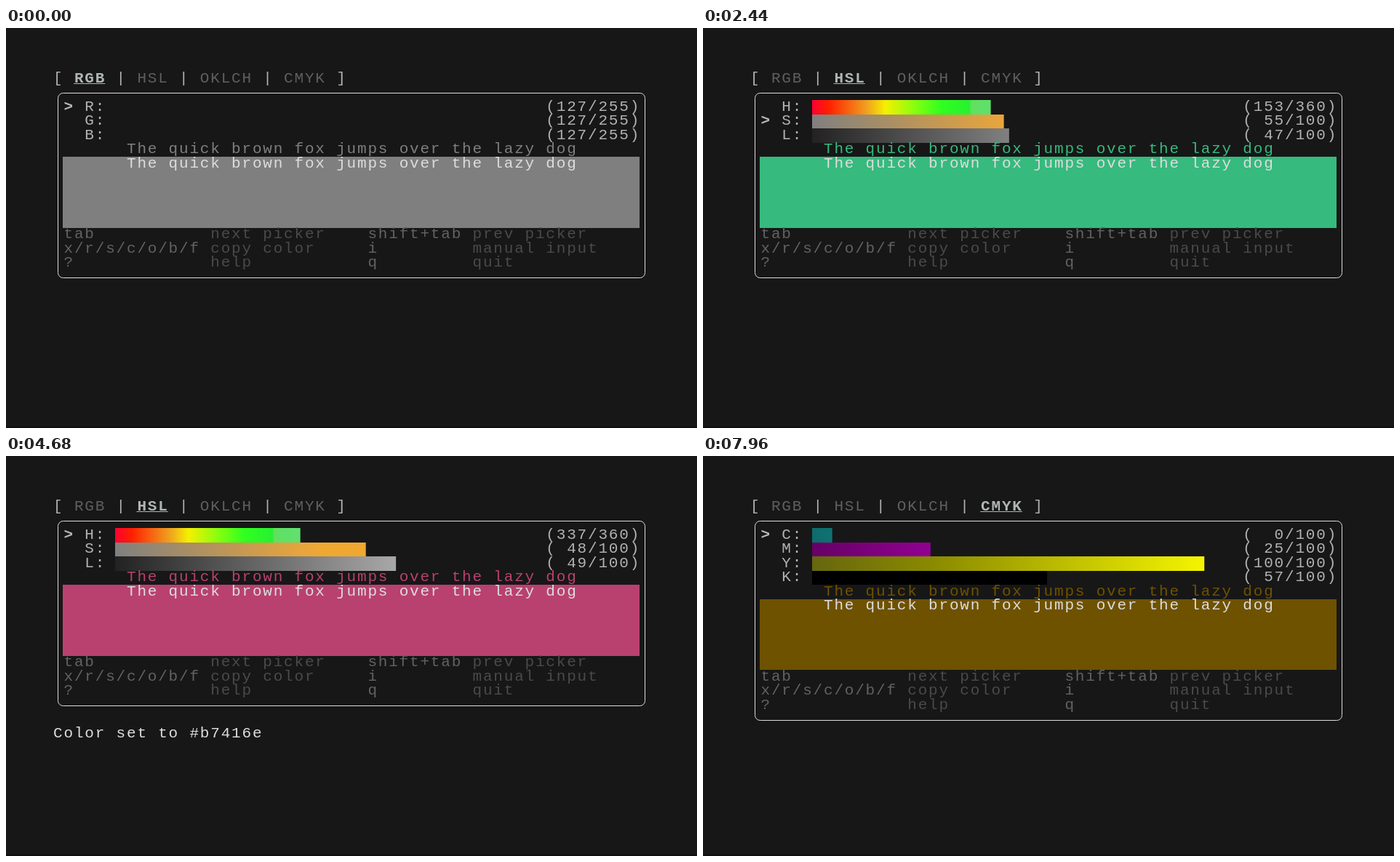
These frames come from a looping animation (950 px wide and 550 px high, 8000 ms). An HTML page with a canvas:

```html
<!DOCTYPE html>
<html lang="en">
<head>
<meta charset="utf-8">
<title>Terminal color picker</title>
<style>
  html, body { margin: 0; width: 100%; height: 100%; overflow: hidden; background: #171717; }
  canvas { display: block; }
</style>
</head>
<body>
<canvas id="stage" width="950" height="550"></canvas>
<script>
const ctx = document.getElementById('stage').getContext('2d');
const LOOP = 8000, TICK = 40;
const CELL = 14.41, LINE = 19.53, LEFT = 64.2, TOP = 60;
const BAR_COL = 6, BAR_CELLS = 40, EDGE = 884;
const FONT = '21px "Liberation Mono", "Courier New", monospace';
const LIGHT = '#b2b2b2', KEY = '#626262', DIM = '#4a4a4a', PALE = '#dddddd';

const colX = c => LEFT + c * CELL;
const rowY = r => TOP + r * LINE;

// Keys are [start, end, value]: the value runs while keys are pressed, the bar follows afterwards.
const channel = (name, max, start, stops, keys) => ({ name, max, start, stops, keys });

const pickers = [
  { name: 'RGB', col: 2, channels: [
    channel('R', 255, 0, [[0, '#600000'], [1, '#ff0000']],
      [[20, 20, 127], [570, 720, 67], [4040, 4040, 183]]),
    channel('G', 255, 0, [[0, '#346400'], [.15, '#007500'], [1, '#00ff00']],
      [[20, 20, 127], [380, 500, 175], [4040, 4040, 65]]),
    channel('B', 255, 0, [[0, '#000060'], [1, '#0000ff']],
      [[20, 20, 127], [4040, 4040, 110]])
  ], color: (r, g, b) => `rgb(${r}, ${g}, ${b})` },

  { name: 'HSL', col: 8, channels: [
    channel('H', 360, .5, [[0, '#ff0030'], [.04, '#ff2000'], [.13, '#f0a020'], [.175, '#f5f000'],
      [.25, '#80ff10'], [.31, '#2eff20'], [.375, '#28f030'], [.38, '#60e060'], [.44, '#60e070'],
      [.5, '#00f0f0'], [.67, '#2020ff'], [.83, '#ff00ff'], [1, '#ff0030']],
      [[1800, 1800, 153], [2720, 2812, 117], [3120, 3240, 159], [4680, 4680, 337]]),
    channel('S', 100, .5, [[0, '#808080'], [.45, '#e8a53c'], [.5, '#f0a830'], [1, '#f0a830']],
      [[1800, 1800, 45], [2360, 2412, 55], [3280, 3300, 60], [4680, 4680, 48]]),
    channel('L', 100, .5, [[0, '#222222'], [1, '#eaeaea']],
      [[1800, 1800, 47], [2560, 2680, 67], [4680, 4680, 49]])
  ], color: (h, s, l) => `hsl(${h}, ${s}%, ${l}%)` },

  { name: 'OKLCH', col: 14, channels: [
    channel('H', 360, .5, [[0, '#f5196e'], [.09, '#ff0010'], [.16, '#ff0000'], [.27, '#e07000'],
      [.5, '#40c040'], [.75, '#3060ff'], [1, '#f5196e']],
      [[5120, 5120, 0], [5280, 5477, 90], [5530, 5560, 98]]),
    channel('C', 500, .5, [[0, '#507c6e'], [.32, '#12aa28'], [1, '#00e000']],
      [[5120, 5120, 159]]),
    channel('L', 1000, .5, [[0, '#000000'], [1, '#eeeeee']],
      [[5120, 5120, 554], [5640, 5880, 454]])
  ], color: (h, c, l) => `oklch(${l / 1000} ${c / 1000} ${h})` },

  { name: 'CMYK', col: 22, channels: [
    channel('C', 100, .39, [[0, '#0f6b6b'], [1, '#00ffff']], [[7760, 7760, 0]]),
    channel('M', 100, .5, [[0, '#660066'], [1, '#ff00ff']], [[7760, 7760, 25]]),
    channel('Y', 100, .5, [[0, '#66660f'], [.3, '#8c8c00'], [1, '#ffff00']], [[7760, 7760, 100]]),
    channel('K', 100, .5, [[0, '#000000'], [1, '#000000']], [[7760, 7760, 57]])
  ], color: (...v) => {
    const [c, m, y, k] = v.map(n => 1 - n / 100);
    return `rgb(${[c, m, y].map(n => Math.round(255 * n * k)).join(', ')})`;
  } }
];

const tabTimes = [[0, 0], [1800, 1], [4040, 0], [4680, 1], [5120, 2], [7760, 3]];
const cursorTimes = [[0, 0], [360, 1], [540, 0], [2320, 1], [2540, 2], [2700, 0],
  [3260, 1], [3340, 0], [5600, 2], [5960, 0]];

const shortHelp = [
  ['tab', 'next picker', 'shift+tab', 'prev picker'],
  ['x/r/s/c/o/b/f', 'copy color', 'i', 'manual input'],
  ['?', 'help', 'q', 'quit']
];
const fullHelp = [
  ['up/k', 'move up', 'down/j', 'move down'],
  ['left/h', 'decrease', 'right/l', 'increase'],
  ...shortHelp,
  ['esc', 'cancel', 'ctrl+c', 'quit']
];
const SAMPLE = 'The quick brown fox jumps over the lazy dog';
const HEX = '#b7416e';

const between = (t, a, b) => t >= a && t < b;
const stepAt = (steps, t) => steps.reduce((v, [at, next]) => t >= at ? next : v, steps[0][1]);

// Critically damped spring.
function spring(from, to, ms) {
  const p = 18 * Math.max(0, ms) / 1000;
  return to + (from - to) * (1 + p) * Math.exp(-p);
}

function valueAt({ keys }, t) {
  let value = keys[0][2];
  for (const [start, end, next] of keys) {
    if (t < start) break;
    value = t >= end ? next : Math.round(value + (next - value) * (t - start) / (end - start));
  }
  return value;
}

function barAt({ keys, start, max }, t) {
  let from = start;
  keys.forEach(([begin, end, value], i) => {
    if (t < begin) return;
    const next = keys[i + 1];
    const until = next ? Math.min(t, next[0]) : t;
    from = spring(from, value / max, until - end);
  });
  return from;
}

function write(text, col, row, color, bold) {
  ctx.font = (bold ? 'bold ' : '') + FONT;
  ctx.fillStyle = color;
  [...text].forEach((ch, i) => {
    if (ch !== ' ') ctx.fillText(ch, colX(col + i + .5), rowY(row) + 14.5);
  });
}

function drawTabs(active) {
  write('[', 0, 0, LIGHT);
  pickers.forEach(({ name, col }, i) => {
    const on = i === active;
    write(name, col, 0, on ? '#aeb6b4' : '#5f5f5f', on);
    if (on) ctx.fillRect(colX(col), rowY(0) + 16, name.length * CELL, 1);
    write(i < pickers.length - 1 ? '|' : ']', col + name.length + 1, 0, LIGHT);
  });
}

function drawChannel(ch, row, t) {
  write(ch.name + ':', 3, row, LIGHT);
  write(`(${String(valueAt(ch, t)).padStart(3)}/${ch.max})`, 47, row, LIGHT);

  // Bars grow by eighths of a cell.
  const cells = Math.floor(barAt(ch, t) * BAR_CELLS * 8) / 8;
  if (cells <= 0) return;
  const x = Math.floor(colX(BAR_COL)), y = Math.round(rowY(row));
  const paint = ctx.createLinearGradient(x, 0, x + BAR_CELLS * CELL, 0);
  ch.stops.forEach(([at, color]) => paint.addColorStop(at, color));
  ctx.fillStyle = paint;
  ctx.fillRect(x, y, colX(BAR_COL + cells) - x, Math.round(rowY(row + 1)) - y);
}

function drawFrame(bottomRow, wide) {
  const y = Math.round(rowY(1.5)) + .5;
  const bottom = Math.round(rowY(bottomRow + .5)) + .5;
  ctx.save();
  ctx.beginPath();
  ctx.rect(0, 0, EDGE, 550);
  ctx.clip();
  ctx.beginPath();
  ctx.roundRect(71.5, y, (wide ? 900 : 878.5) - 71.5, bottom - y, 7);
  ctx.strokeStyle = PALE;
  ctx.lineWidth = 1;
  ctx.stroke();
  ctx.restore();
}

function draw(t) {
  ctx.fillStyle = '#171717';
  ctx.fillRect(0, 0, 950, 550);
  ctx.fillStyle = '#120d12';
  ctx.fillRect(0, 548, 950, 2);

  const active = stepAt(tabTimes, t);
  const { channels, color } = pickers[active];
  const wide = active === 2;
  drawTabs(active);

  channels.forEach((ch, i) => drawChannel(ch, 2 + i, t));
  write('>', 1, 2 + stepAt(cursorTimes, t), '#b4bcba', true);

  const shade = color(...channels.map(ch => valueAt(ch, t)));
  let row = 2 + channels.length;
  write(SAMPLE, 7, row++, shade);
  const fillTop = Math.round(rowY(row)), fillEnd = Math.round(rowY(row + 5));
  ctx.fillStyle = shade;
  ctx.fillRect(78, fillTop, (wide ? EDGE : 871) - 78, fillEnd - fillTop);
  write(SAMPLE, 7, row, PALE);
  row += 5;

  for (const [key, what, key2, what2] of between(t, 6960, 7680) ? fullHelp : shortHelp) {
    write(key, 1, row, KEY);
    write(what, 15, row, DIM);
    write(key2, 30, row, KEY);
    write(what2, 40, row, DIM);
    row++;
  }

  if (between(t, 3560, 4040)) {
    const typed = Math.min(HEX.length, Math.max(0, Math.floor((t - 3540) / 60)));
    write('> ' + HEX.slice(0, typed), 1, row + 1, LIGHT);
    row += 3;
  }
  drawFrame(row, wide);

  if (between(t, 4040, 6920)) write('Color set to ' + HEX, 0, 16, PALE);
}

ctx.textAlign = 'center';
const began = performance.now();
function loop() {
  const t = (performance.now() - began) % LOOP;
  draw(Math.floor(t / TICK) * TICK);
  requestAnimationFrame(loop);
}
loop();
</script>
</body>
</html>
```
